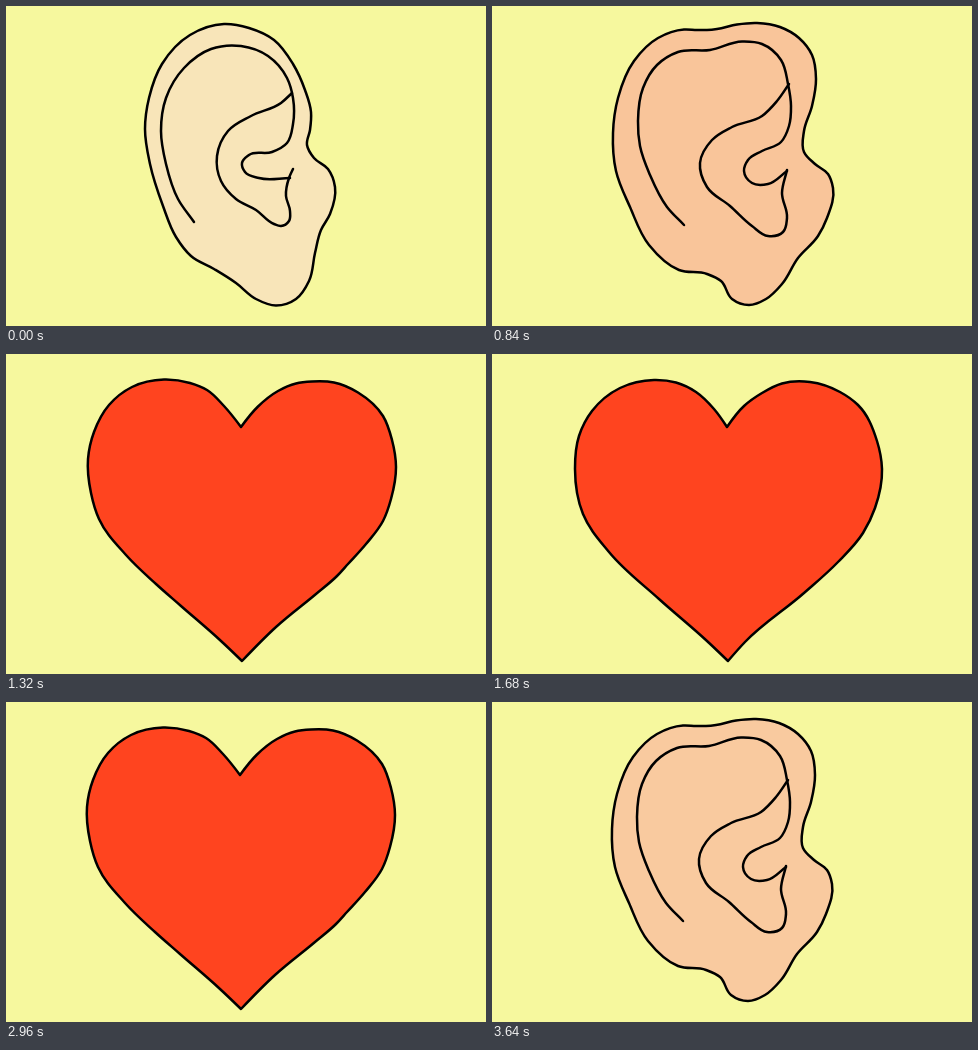
These frames come from a looping animation (480x320 px, 3.68 s). An HTML page:

```html
<!DOCTYPE html>
<html>
<head>
<meta charset="utf-8">
<style>
  html, body { margin: 0; width: 100%; height: 100%; overflow: hidden; background: #f6f89e; }
  svg { display: block; }
  path { fill: none; stroke: #000; stroke-width: 2.5; stroke-linecap: round; stroke-linejoin: round; }
</style>
</head>
<body>
<svg width="480" height="320" viewBox="0 0 480 320">
  <g id="art">
    <path id="outline"/>
    <path id="helix" pathLength="533"/>
    <path id="concha" pathLength="324"/>
  </g>
</svg>
<script>
const LOOP = 3680;
const EAR_COLOR = [248, 229, 185], HEART_COLOR = [255, 68, 31];
const el = id => document.getElementById(id);
const points = text => text.split(' ').map(p => p.split(',').map(Number));

const ear = {
  outline: points('218,18 243,22 268,34 287,58 299,84 305,106 304,124 301,139 308,152 322,163 329,181 324,208 315,224 309,247 303,275 290,293 270,299.5 250,293 230,277 208,263 185,250 170,231 157,200 144,158 139,123 143,92 156,58 184,29'),
  helix: points('188,216 172,193 160,158 155,125 160,92 178,62 205,43 235,40 262,50 281,72 287,92 287,118 281,137 266,146 243,149 236,157 239,166 253,172 284,172'),
  concha: points('286,87 275,97 245,110 222,125 211,150 215,175 230,193 250,204 268,218 275,220 283,215 284,205 280,190 283,172 287,163')
};
const morphStart = {
  outline: points('225,23 245,18.5 265,17 288,21 307,32 320,49 324,73 320,100 312,125 312,146 323,158 336,168 341,182 335,212 326,230 306,252 290,278 274,293 257,299 240,293 229,275 215,268 187,264 157,239 138,201 124,165 121,127 126,92 142,55 166,32 192,23.5 205,24 215,24'),
  helix: points('192,219 175,201 158,169 148,140 146,115 151,82 165,59 186,46 218,44 250,35.5 270,38 289,54 296,78 299,100 297,120 289,136 270,145 256,154 252,165 260,177 276,178 295,165'),
  concha: points('297,78 285,95 270,110 240,121 220,134 208,157 215,181 238,200 260,220 276,230 291,226 295,212 290,187 295,164')
};
const morphEnd = {
  outline: points('236,50 258,41 284,27 314,21.5 345,33 363,51 373,74 371,88 369,102 375,120 379,137 380,157 374,179 357,204 337,222 313,243 270,282 254,295 240,306 225,296 207,279 190,261 170,247 138,217 115,187 99,148 95,112 101,76 123,42 145,26 174,21.5 207,35 225,46'),
  helix: points('176,231 162,222 140,196 132,173 126,135 133,88 152,65 185,47 210,49 262,46 285,42 310,49 325,68 326,90 316,115 302,133 285,150 275,162 273,171 277,176 288,174 300,163'),
  concha: points('307,83 297,91 275,100 245,109 211,126 197,150 212,178 229,195 252,213 273,230 285,225 294,208 295,183 300,163')
};
const hearts = [
  '235,73 252,52 270,39 290,29.5 318,28 348,38 366,51 385,87 390,115 383,154 371,179 346,208 312,239 253,288 236,307 215,287 167,245 117,198 91,160 83,115 87,82 100,57 128,34 162,26 184,28.5 204,38 222,55',
  '235,73 252,52.5 272,37 290,29.5 306,27.5 328,28.5 352,38.5 377,62 386,86 390,113 385,145 377,167 360,190 342,210 331,222 310,240 270,273 236,307 215,287 175,252 150,230 120,201 93,165 85,139 82,105 88,78 103,51 126,33 158,25.5 184,29 201,36 218,52'
].map(points);

// Stretches of each inner line that open up during the morph
const gaps = {
  helix: points('17,75 123,187 204,229 250,310 321,353 399,451 506,525'),
  concha: points('13,65 78,106 119,166 183,192 196,244 259,326')
};

const mix = (a, b, k) => a + (b - a) * k;
const mixPoints = (a, b, k) => a.map((p, i) => p.map((v, j) => mix(v, b[i][j], k)));
const wobble = (pts, pose) => pose === 0 ? pts : pts.map(([x, y], i) =>
  [x + 0.7 * Math.sin(i * 2.1 + pose * 2), y + 0.7 * Math.cos(i * 1.7 + pose * 3)]);

// Unit tangent of the circle through three points; zero at a sharp corner
function tangent(prev, p, next) {
  const ax = p[0] - prev[0], ay = p[1] - prev[1], bx = next[0] - p[0], by = next[1] - p[1];
  const a = Math.hypot(ax, ay), b = Math.hypot(bx, by);
  if (!a || !b) return a ? [ax / a, ay / a] : [bx / b, by / b];
  if ((ax * bx + ay * by) / (a * b) < 0.35) return [0, 0];
  const tx = ax * b / a + bx * a / b, ty = ay * b / a + by * a / b, t = Math.hypot(tx, ty);
  return [tx / t, ty / t];
}

function smooth(pts, closed) {
  const n = pts.length;
  const at = i => closed ? pts[(i + n) % n] : pts[Math.max(0, Math.min(n - 1, i))];
  const tangents = pts.map((p, i) => tangent(at(i - 1), p, at(i + 1)));
  let d = 'M' + pts[0];
  for (let i = 0; i < (closed ? n : n - 1); i++) {
    const p = at(i), q = at(i + 1), u = tangents[i], v = tangents[(i + 1) % n];
    const h = Math.hypot(q[0] - p[0], q[1] - p[1]) * 0.35;
    d += `C${p[0] + u[0] * h},${p[1] + u[1] * h} ${q[0] - v[0] * h},${q[1] - v[1] * h} ${q}`;
  }
  return closed ? d + 'Z' : d;
}

function dashes(list, k) {
  if (k === 0) return 'none';
  const out = [];
  let pos = 0;
  for (const [from, to] of list) {
    const mid = (from + to) / 2, half = (to - from) / 2 * k;
    out.push(mid - half - pos, 2 * half);
    pos = mid + half;
  }
  return [...out, 999, 0].join(' ');
}

function draw(shape, redness, open = 0) {
  el('outline').setAttribute('d', smooth(shape.outline, true));
  el('outline').style.fill = `rgb(${EAR_COLOR.map((c, i) => Math.round(mix(c, HEART_COLOR[i], redness)))})`;
  for (const id of ['helix', 'concha']) {
    el(id).setAttribute('d', shape[id] ? smooth(shape[id], false) : '');
    el(id).style.strokeDasharray = dashes(gaps[id], open);
  }
}

function render(t) {
  const step = Math.floor(t / 40) * 40;
  const pose = Math.floor(t / 80) % 3;
  el('art').setAttribute('transform', `translate(${t < 2000 ? 0 : -1} 0)`);

  if (step < 840) {
    draw({
      outline: wobble(ear.outline, pose),
      helix: wobble(ear.helix, pose),
      concha: wobble(ear.concha, pose)
    }, 0);
  } else if (step >= 1040 && step < 3480) {
    draw({ outline: pose === 1 ? hearts[1] : wobble(hearts[0], pose) }, 1);
  } else {
    const forward = step < 1040;
    const k = (forward ? step - 840 : 3640 - step) / 160;
    const shape = {};
    for (const id in morphStart) shape[id] = mixPoints(morphStart[id], morphEnd[id], k);
    draw(shape, forward ? (step - 800) / 200 : (LOOP - step) / 240, k);
  }
}

const start = performance.now();
function tick() {
  render((performance.now() - start) % LOOP);
  requestAnimationFrame(tick);
}
tick();
</script>
</body>
</html>
```
